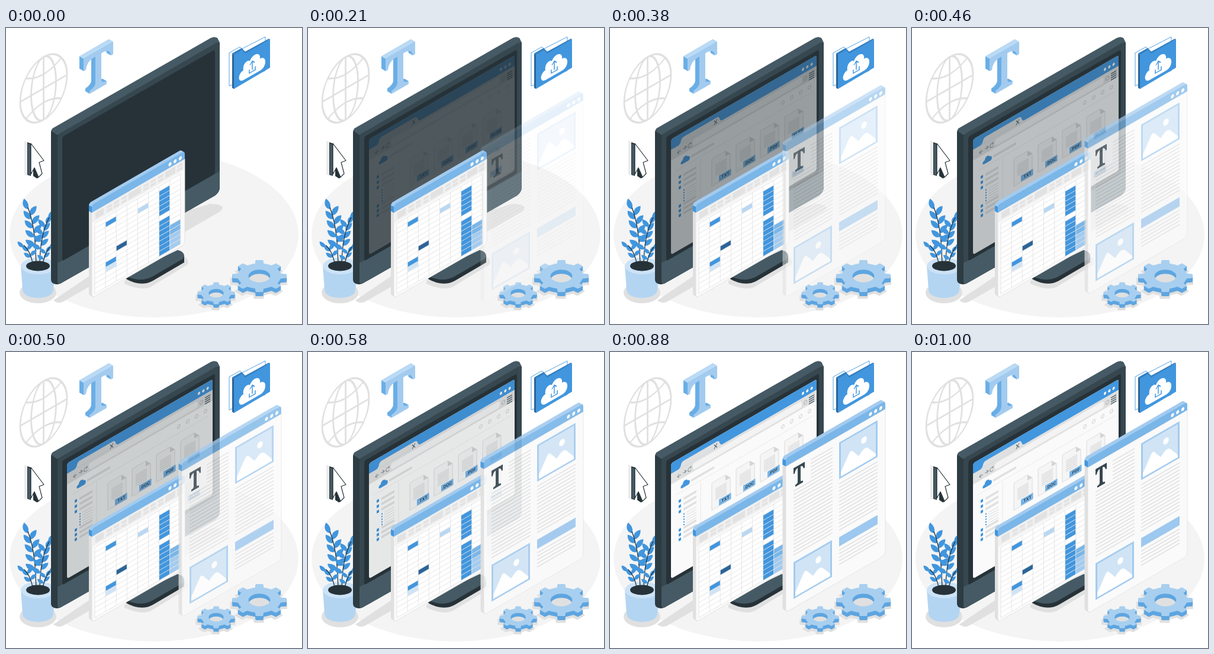
Write an HTML page that moves like this. It is 500 px wide and 500 px high and loops after 1.04 s.

```html
<!DOCTYPE html>
<html lang="en">
<head>
<meta charset="utf-8">
<title>Files on a desktop</title>
<style>
html, body { margin: 0; width: 100%; height: 100%; overflow: hidden; background: #fff; }
svg { display: block; width: 100vw; height: 100vh; }
text { font: 500 7.2px Roboto, Arial, sans-serif; fill: #263238; text-anchor: middle; }
</style>
</head>
<body>
<svg id="stage" viewBox="0 0 500 500"></svg>
<script>
const BLUE = '#4196de', MID = '#7ab6e8', LIGHT = '#a3cbef', PALE = '#d0e4f6';
const INK = '#263238', SLATE = '#37474f', STEEL = '#455a64', GREY = '#e0e0e0', PAPER = '#fafafa';

const many = (n, fn) => Array.from({ length: n }, (_, i) => fn(i)).join('');
const path = (d, fill, more = '') => `<path d="${d}" fill="${fill}" ${more}/>`;
const line = (d, color, width = 1) => path(d, 'none', `stroke="${color}" stroke-width="${width}"`);
const rect = (x, y, w, h, fill, more = '') =>
  `<rect x="${x}" y="${y}" width="${w}" height="${h}" fill="${fill}" ${more}/>`;
const oval = (x, y, rx, ry, fill, more = '') =>
  `<ellipse cx="${x}" cy="${y}" rx="${rx}" ry="${ry}" fill="${fill}" ${more}/>`;
const at = (x, y, body) => `<g transform="translate(${x} ${y})">${body}</g>`;
// Isometric wall: x stays in screen pixels, y runs straight down
const wall = (x, y, body) => `<g transform="translate(${x} ${y}) skewY(-30)">${body}</g>`;
const extrude = (depth, body) =>
  many(depth * 2, i => at(i / 2 - depth, (i / 2 - depth) * 1.155, body));

function panel(w, h, head, depth, body) {
  const page = `M0 ${head}H${w}V${h - 7}Q${w} ${h} ${w - 6} ${h}H5Q0 ${h} 0 ${h - 6}Z`;
  const bar = `M0 ${head}V5Q0 0 4 0H${w - 4}Q${w} 0 ${w} 5V${head}Z`;
  const back = -depth * 1.155;
  return extrude(depth, path(page, GREY) + path(bar, LIGHT)) +
    path(`M0 3V${head}L${-depth} ${head + back}V${back + 4}Z`, BLUE) +
    path(page, PAPER, `stroke="${GREY}" stroke-width=".8"`) + path(bar, MID) +
    many(3, i => oval(w - 25 + i * 8.7, 7.5, 2.6, 3, '#fff')) + body;
}

function globe() {
  const arc = s => `M-31 ${s * 35}Q0 ${s * 13} 31 ${s * 35}`;
  const ring = `stroke="${GREY}" stroke-width="2.8"`;
  return wall(63.5, 102, oval(0, 0, 39.5, 53, 'none', ring) + oval(0, 0, 21, 53, 'none', ring) +
    line('M-39 0H39M0-53V53' + arc(-1) + arc(1), GREY, 2.8));
}

function bigLetter() {
  const d = 'M0 0H50V21H46Q45 9 34 8H30V52Q30 59 39 60V65H10V60Q20 59 20 52V8H16Q5 9 4 21H0Z';
  return wall(131, 52, extrude(7, path(d, '#6aaee6')) +
    path('M0 0L-7-8H43L50 0Z', '#badaf5') + path(d, LIGHT));
}

function cursor() {
  const d = 'M42 195L64 224L56 227L61 246L55 252L48 236L42 247Z';
  return path('M31 190L36 193V250L31 247Z', '#ebebeb') +
    path('M36 193L42 195V250L36 248ZM48 236L55 253L52 254L46 250V240Z', INK) +
    path('M37 195L41 197V249L37 247Z', STEEL) +
    path(d, '#fff', `stroke="${INK}" stroke-width="1.2" stroke-linejoin="round"`);
}

function folder() {
  const cloud = 'M-14 11C-25 11-25-5-15-6C-17-17-8-20-4-15C1-26 15-20 13-9C25-9 25 11 14 11Z';
  return path('M377 42L395 32L399 35L438 15V72L377 98Z', '#fff', `stroke="${BLUE}" stroke-width=".9"`) +
    path('M382 43L385 45V103L382 101Z', '#2b6498') +
    path('M382 43L398 34L404 40L446 19V67L385 103V45Z', BLUE) +
    path('M382 43L398 34L404 40L444 18L446 19L404 43L399 37L385 45Z', '#347fc0') +
    wall(416, 68.5, path(cloud, '#fff') +
      line('M-5-1V5H5V-1M0 2V-12M-4-8L0-12.5L4-8', BLUE, 1.5));
}

function plant() {
  const leaf = (x, y, angle, size) => path(
    `M0 0C${size * .2} ${-size * .38} ${size * .7} ${-size * .36} ${size} 0` +
    `C${size * .7} ${size * .22} ${size * .3} ${size * .28} 0 0`, BLUE,
    `transform="translate(${x} ${y}) rotate(${angle})"`);
  const stem = (p, count, size) => {
    const axis = (t, i) => {
      const u = 1 - t;
      return u * u * u * p[i] + 3 * u * u * t * p[i + 2] + 3 * u * t * t * p[i + 4] + t * t * t * p[i + 6];
    };
    const tilt = Math.atan2(p[7] - p[5], p[6] - p[4]) * 180 / Math.PI;
    const side = (t, angle) => leaf(axis(t, 0), axis(t, 1), angle, size);
    return many(count, i => {
      const t = .35 + .6 * i / count;
      return side(t, -162 + 35 * t) + side(t + .06, -30 - 35 * t);
    }) + leaf(p[6], p[7] + 3, tilt, size) + line(`M${p[0]} ${p[1]}C${p.slice(2).join(' ')}`, INK, 1.3);
  };
  return oval(54, 447, 31, 18, GREY) +
    path('M25 402L28 443Q30 455 54 456Q78 455 80 443L84 402Z', '#b3d5f2') +
    oval(54.5, 402, 29.5, 14, '#cce2f6') + oval(54, 402, 20, 8.5, INK) +
    stem([51, 402, 50, 370, 49, 335, 37, 303], 4, 19) +
    stem([57, 402, 57, 375, 60, 345, 73, 320], 4, 17) +
    stem([46, 402, 43, 386, 39, 375, 30, 367], 2, 14) +
    stem([62, 402, 63, 390, 66, 380, 74, 370], 2, 13);
}

function monitor() {
  return path('M80 460L302 310L345 297Q362 297 366 303Q365 308 360 311L97 462Q88 467 80 460Z', GREY) +
    path('M200 427L300 385Q311 392 306 400L245 437Q230 445 200 432Z', GREY) +
    path('M203 422L240 395L301 384V396L248 427Q228 438 203 424Z', INK) +
    path('M203 417L290 375Q302 378 301 386Q300 389 297 391L247 420Q228 430 205 420Z', STEEL) +
    path('M76 176Q76 172 80 169L346 17Q352 14 357 17L361 25V270Q360 278 353 283L91 432Q86 434 81 432Q76 430 76 425Z', '#2d3b42') +
    path('M78 170L346 17Q352 14 357 17L361 25L87 181L77 174Z', STEEL) +
    path('M87 185Q87 181 91 178L355 25Q361 23 361 30V270Q360 278 353 283L93 431Q87 434 87 427Z', SLATE) +
    path('M87 397L361 242V270Q360 278 353 283L93 431Q87 434 87 427Z', STEEL) +
    path('M95 187Q95 184 98 182L350 38Q353 36 353 41V243Q353 246 350 248L98 392Q95 394 95 390Z', INK);
}

function fileIcon(x, y, name) {
  return at(x, y, path('M0 2Q0 0 2 0H23L31 9V46H0Z', '#f5f5f5', `stroke="${GREY}" stroke-width="1.2"`) +
    path('M23 0L31 9H23Z', '#d4d4d4') + rect(6, 13, 19, 20, '#ebebeb') +
    line(many(6, i => `M6 ${14 + i * 3.6}H25`), '#d9d9d9', .8) +
    rect(12, 35, 20.5, 10.5, MID) + `<text x="22" y="42.8">${name}</text>`);
}

function desktop() {
  const names = ['.TXT', '.DOC', '.PDF', '.XLSX'];
  const squares = [71, 80, 89, 120, 128, 136];
  return wall(103, 188,
    path('M0 5Q0 0 4 0H243Q246 0 246 4V190Q246 195 242 195H4Q0 195 0 191Z', PAPER) +
    path('M0 18V5Q0 0 4 0H243Q246 0 246 4V18Z', BLUE) + rect(0, 18, 246, 18, GREY) +
    path('M12 18Q16 17 17 12Q18 8 22 8H77Q81 8 82 12Q83 17 87 18Z', GREY) +
    line('M73 11L78 18M78 11L73 18', STEEL, 1) +
    many(3, i => oval(223 + i * 7.3, 10.5, 2, 2.4, '#fff')) +
    rect(37, 22, 184, 11, '#f3f3f3', 'rx="4"') +
    line('M17 29H11L14 26M11 29L14 32M20 28H26L23 25M26 28L23 31M34 26A3 3.5 0 1 0 34 31M34 24V27H32', '#78868c', .9) +
    oval(227, 28, 2.5, 3, 'none', 'stroke="#b4b4b4"') +
    line('M233 24H242M233 27.5H242M233 31H242M233 34.5H242', STEEL, 1.4) +
    path('M19 53C15 53 16 47 20 47C20 41 27 41 28 45C33 45 33 53 29 53Z', BLUE) +
    rect(34, 47, 39, 4, GREY) +
    many(4, i => oval(189 + i * 15, 47, 2.3, 2.8, 'none', 'stroke="#d6d6d6" stroke-width="1.2"')) +
    line('M8 58H240M50 61V186', '#e4e4e4', .8) +
    squares.map(y => rect(13, y - 1.3, 4, 4.8, BLUE) + rect(21, y - 1, 22, 4, GREY)).join('') +
    many(5, i => rect(21, 97 + i * 4.5, 2, 2.2, BLUE) + rect(26, 97.5 + i * 4.5, 17, 1.3, GREY)) +
    names.map((name, i) => fileIcon(69 + i * 41, 73, name)).join('') +
    fileIcon(192, 138, names[3]));
}

function sheet() {
  const col = 18.1, row = 8.45, left = 5, top = 34.5;
  const cell = (c, r, color) => rect(left + c * col, top + r * row, col, row, color);
  const tools = [[6, 14], [25, 9], [37, 9], [50, 9], [62, 21], [87, 9], [99, 9], [112, 9], [124, 17], [144, 9]];
  return wall(145, 298.7, panel(157, 157.5, 13.5, 5,
    rect(0, 13.5, 157, 17, '#f0f0f0') +
    tools.map(([x, w]) => w > 10 ? rect(x, 16.5, w, 11, '#e2e2e2')
      : rect(x, 17.5, w, 4, '#e2e2e2') + rect(x, 23.5, w, 4, '#e2e2e2')).join('') +
    rect(left, top, col * 8, row * 14, '#fff') +
    cell(1, 1, BLUE) + cell(4, 2, '#b9d8f3') + cell(2, 7, '#2b6498') + cell(1, 9, BLUE) + cell(1, 10, PALE) +
    many(13, i => i === 5 ? '' : cell(6, i + 1, BLUE)) +
    many(5, i => cell(7, i + 9, i < 2 ? MID : LIGHT)) +
    line(many(9, i => `M${left + i * col} ${top}v${row * 14}`) +
      many(15, i => `M${left} ${top + i * row}h${col * 8}`), '#e3e3e3', .9)));
}

function article() {
  const rules = (x, y, w, n) => line(many(n, i => `M${x} ${y + i * 6}h${w}`), '#dcdcdc', 1.5);
  const photo = (x, y) => at(x, y, rect(1.5, 1.5, 62, 59, PALE, `stroke="${LIGHT}" stroke-width="3"`) +
    path('M3 59V52L17 28Q20 24 23 28L33 42Q39 36 43 35Q47 34 51 40L62 55V59Z', '#fff') +
    oval(42, 20, 4.7, 5.5, '#fff'));
  return wall(297, 181.5, panel(168, 260, 13.5, 5.5,
    path('M13 24H32V34H30Q29 28 25 27.5V51Q25 54 29 54V57H16V54Q20 54 20 51V27.5Q16 28 15 34H13Z', SLATE) +
    at(0, 3, rules(42, 24, 37, 6) + rules(13, 60, 66, 19) + photo(13, 180) +
      photo(90, 22) + rules(90, 92, 65, 14) + rect(90, 182, 65, 15.5, '#9dc8ef') + rules(90, 204, 65, 5))));
}

function gear(x, y, size, depth) {
  const teeth = 8, steps = [[-.36, .8], [-.25, .8], [-.17, 1], [.17, 1], [.25, .8]];
  let d = '';
  for (let i = 0; i < teeth; i++) for (const [a, r] of steps) {
    const angle = (i + a) * 2 * Math.PI / teeth;
    d += `${d ? 'L' : 'M'}${size * r * Math.cos(angle)} ${size * r * .59 * Math.sin(angle)}`;
  }
  const rx = size * .4, ry = rx * .58;
  const hole = `M${-rx} 0a${rx} ${ry} 0 1 0 ${2 * rx} 0a${rx} ${ry} 0 1 0 ${-2 * rx} 0`;
  const face = color => path(d + 'Z' + hole, color, 'fill-rule="evenodd"');
  return at(x, y, at(-1, depth + 2, path(d + 'Z', GREY, `stroke="${GREY}" stroke-width="5"`)) +
    many(depth, i => at(0, depth - i, face('#5ea5e0'))) + face('#a8cfef'));
}

document.getElementById('stage').innerHTML =
  oval(250, 349, 244, 140, '#f4f4f4') + globe() + bigLetter() + cursor() + folder() +
  plant() + monitor() + `<g id="desktop">${desktop()}</g>` + sheet() +
  gear(355, 448, 31.5, 6) + gear(428, 419, 46, 7) + `<g id="article">${article()}</g>`;

const LOOP = 1040, RISE = 1000, LEAD = 20;
const curve = (a, b, s) => 3 * a * s * (1 - s) ** 2 + 3 * b * s * s * (1 - s) + s ** 3;

function ease(x) {
  let low = 0, high = 1;
  for (let i = 0; i < 30; i++) {
    const mid = (low + high) / 2;
    if (curve(.36, .5, mid) < x) low = mid; else high = mid;
  }
  return curve(-.01, 1.38, low);
}

const desk = document.getElementById('desktop'), page = document.getElementById('article');
const start = performance.now();

function draw() {
  const time = (performance.now() - start) % LOOP;
  const shown = ease(Math.min(1, (time + LEAD) / RISE));
  const opacity = Math.max(0, Math.min(1, shown));
  desk.setAttribute('opacity', opacity);
  page.setAttribute('opacity', opacity);
  page.setAttribute('transform', `translate(0 ${30 * (1 - shown)})`);
  requestAnimationFrame(draw);
}
draw();
</script>
</body>
</html>
```
